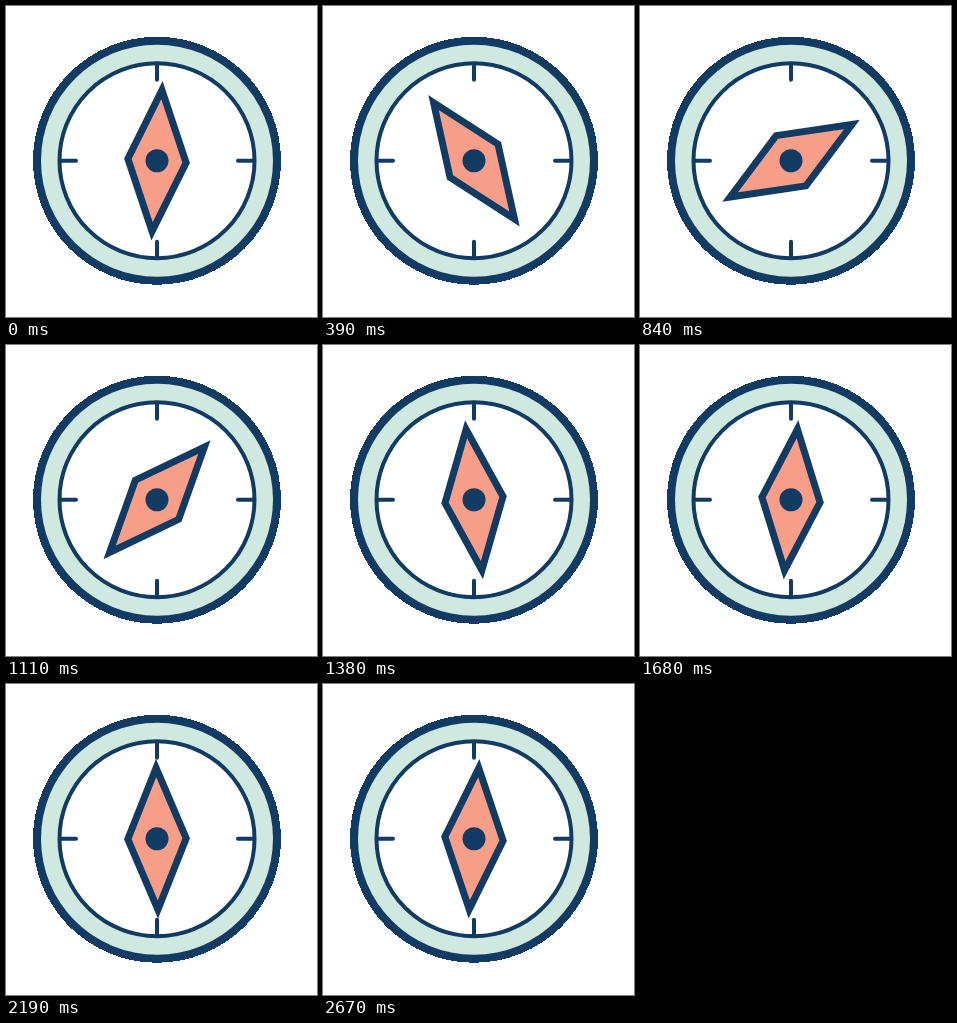
Recreate the animation shown at these times as an HTML page. Size 311x311 px, loop 2700 ms.

```html
<!DOCTYPE html>
<html lang="en">
<head>
<meta charset="utf-8">
<title>Compass</title>
<style>
  html, body { margin: 0; width: 100%; height: 100%; overflow: hidden; background: #fff; }
  svg { display: block; width: 311px; height: 311px; }
</style>
</head>
<body>
<svg viewBox="-151 -154.75 311 311" fill="none" stroke="#123b63">
  <circle r="124" fill="#123b63" stroke="none" shape-rendering="crispEdges"/>
  <circle r="116" fill="#cfe9e0" stroke="none"/>
  <circle r="97.5" fill="#fff" stroke-width="4"/>
  <path d="M0-97V-81M0 97V81M-97 0H-81M97 0H81" stroke-width="4" stroke-linecap="round"/>
  <path id="needle" d="M0-70.8L29.2 0 0 70.8-29.2 0Z" fill="#f79e88" stroke-width="7"/>
  <circle r="11.5" fill="#123b63" stroke="none"/>
</svg>
<script>
  const LOOP = 2700;
  // Turning points of the swing: [time in ms, angle in degrees]
  const swing = [[0, 4], [408, -35], [912, 64], [1452, -9.5], [1890, 18], [2310, -5], [LOOP, 4]];
  const needle = document.getElementById('needle');

  function angleAt(time) {
    const next = swing.findIndex(([t]) => t > time);
    const [t0, a0] = swing[next - 1];
    const [t1, a1] = swing[next];
    const ease = (1 - Math.cos(Math.PI * (time - t0) / (t1 - t0))) / 2;
    return a0 + (a1 - a0) * ease;
  }

  function draw() {
    needle.setAttribute('transform', `rotate(${angleAt(performance.now() % LOOP)})`);
    requestAnimationFrame(draw);
  }
  draw();
</script>
</body>
</html>
```
